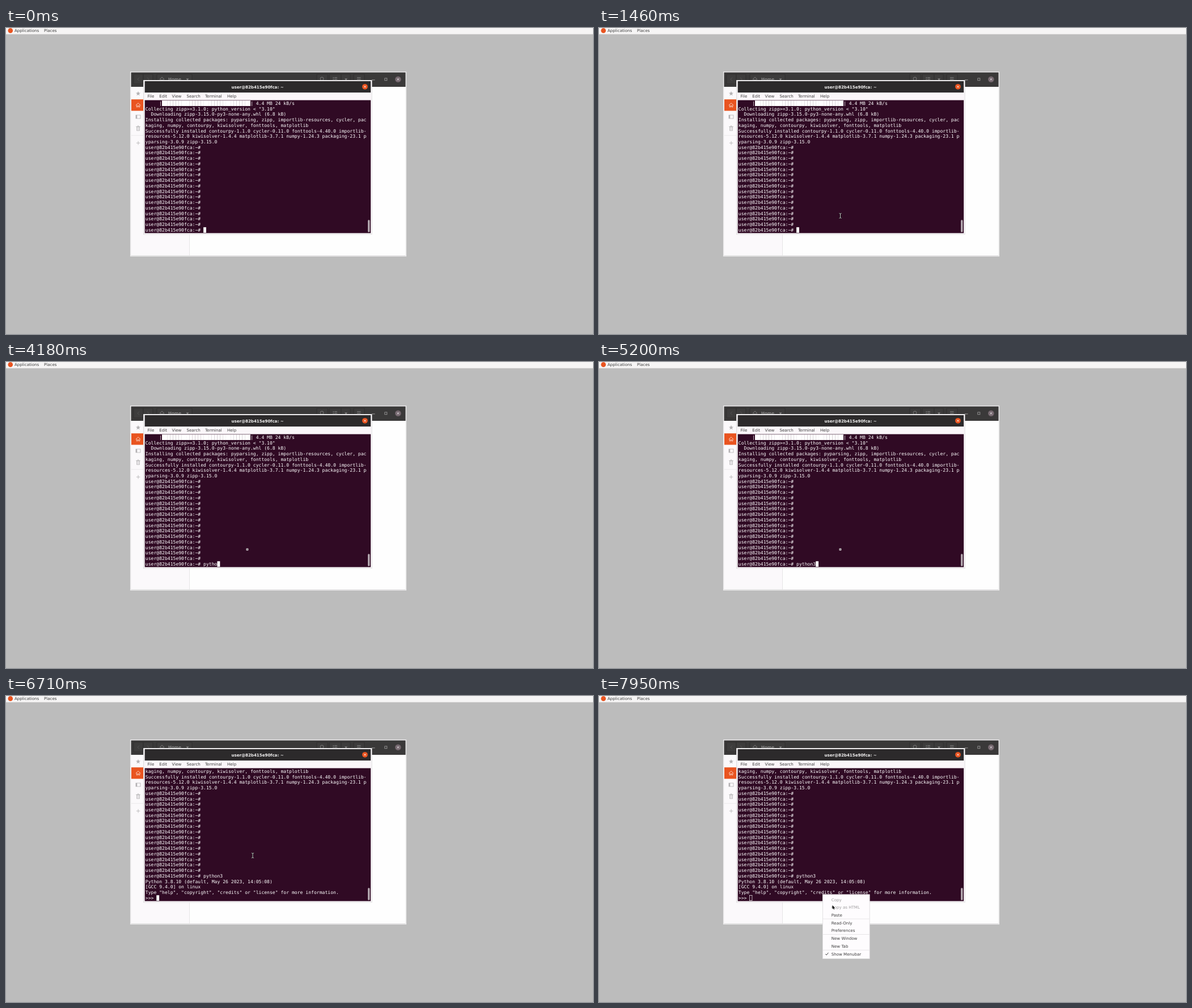
An HTML page with a canvas that plays this animation: 1035 by 541 pixels, repeating every 8 s.

```html
<!DOCTYPE html>
<html lang="en">
<head>
<meta charset="utf-8">
<title>Terminal session</title>
<style>
html, body { margin: 0; width: 100%; height: 100%; overflow: hidden; background: #bcbcbc; }
canvas { display: block; width: 1035px; height: 541px; }
</style>
</head>
<body>
<canvas id="stage" width="1035" height="541"></canvas>
<script>
const ctx = document.getElementById('stage').getContext('2d');
const LOOP = 8000;
const UI = '"DejaVu Sans", sans-serif';
const MONO = '"DejaVu Sans Mono", monospace';
const COL = 4.871, ROW = 9.741, LEFT = 245.8, TOP = 128.2, ROWS = 24;
const ACCENT = '#e95420';

const HOST = 'user@82b415e90fca';
const PROMPT = HOST + ':~# ';
const HEAD = [
  '     |' + '\u2588'.repeat(32) + '| 4.4 MB 24 kB/s',
  'Collecting zipp>=3.1.0; python_version < "3.10"',
  '  Downloading zipp-3.15.0-py3-none-any.whl (6.8 kB)',
  'Installing collected packages: pyparsing, zipp, importlib-resources, cycler, pac',
  'kaging, numpy, contourpy, kiwisolver, fonttools, matplotlib',
  'Successfully installed contourpy-1.1.0 cycler-0.11.0 fonttools-4.40.0 importlib-',
  'resources-5.12.0 kiwisolver-1.4.4 matplotlib-3.7.1 numpy-1.24.3 packaging-23.1 p',
  'yparsing-3.0.9 zipp-3.15.0'
];
const BANNER = [
  'Python 3.8.10 (default, May 26 2023, 14:05:08)',
  '[GCC 9.4.0] on linux',
  'Type "help", "copyright", "credits" or "license" for more information.'
];
const COMMAND = 'python3';
const KEY_TIMES = [2870, 3800, 4030, 4100, 4180, 4350, 5200];
const RUN = 5520, MENU = 7500;
const BLINK_OFF = [[3480, 3800], [4900, 5200], [6070, 6710], [7250, MENU]];

// Pointer stops: time, x, y, shape
const POINTER = [
  [0, 0, 0, 'none'],
  [150, 893, 536, 'arrow'], [230, 800, 521, 'arrow'], [310, 690, 492, 'arrow'],
  [390, 600, 455, 'arrow'], [470, 522, 410, 'arrow'], [545, 490, 379, 'arrow'],
  [620, 450, 347, 'beam'], [700, 428, 327, 'beam'], [780, 421, 320, 'beam'],
  [1390, 423.5, 327, 'beam'], [1460, 425.5, 332, 'beam'], [2790, 425.5, 331.5, 'dot'],
  [6390, 429, 315, 'beam'], [6460, 436, 278.5, 'beam'],
  [6710, 435, 282, 'beam'], [6790, 428, 297, 'beam'], [6870, 417, 317, 'beam'],
  [6950, 406, 334, 'beam'], [7030, 397, 347, 'beam'], [7100, 394.2, 351, 'beam'],
  [MENU, 394, 351, 'arrow'],
  [7800, 400, 357, 'arrow'], [7870, 406.5, 364.5, 'arrow'], [7950, 411.5, 370, 'arrow']
];

function rect(x, y, w, h, fill) {
  ctx.fillStyle = fill;
  ctx.fillRect(x, y, w, h);
}

function disc(x, y, r, fill) {
  ctx.fillStyle = fill;
  ctx.beginPath();
  ctx.arc(x, y, r, 0, Math.PI * 2);
  ctx.fill();
}

function line(points, color, width = 0.8, close = false) {
  ctx.beginPath();
  points.forEach(([x, y]) => ctx.lineTo(x, y));
  if (close) ctx.closePath();
  ctx.strokeStyle = color;
  ctx.lineWidth = width;
  ctx.stroke();
}

function frame(x, y, w, h, color, width = 0.7) {
  ctx.strokeStyle = color;
  ctx.lineWidth = width;
  ctx.strokeRect(x, y, w, h);
}

// y is the middle of the capitals
function label(text, x, y, color, weight = '', align = 'left') {
  ctx.font = `${weight} 7.08px ${UI}`;
  ctx.textAlign = align;
  ctx.fillStyle = color;
  ctx.fillText(text, x, y + 2.55);
}

function cross(x, y, r, color) {
  line([[x - r, y - r], [x + r, y + r]], color, 0.9);
  line([[x + r, y - r], [x - r, y + r]], color, 0.9);
}

function caret(x, y, color) {
  ctx.fillStyle = color;
  ctx.beginPath();
  ctx.moveTo(x - 2.4, y - 1.2);
  ctx.lineTo(x + 2.4, y - 1.2);
  ctx.lineTo(x, y + 1.6);
  ctx.fill();
}

function house(x, y, color) {
  line([[x - 4, y + 0.3], [x, y - 3.7], [x + 4, y + 0.3]], color);
  line([[x - 2.8, y - 0.6], [x - 2.8, y + 3.4], [x - 0.9, y + 3.4], [x - 0.9, y + 1.2],
    [x + 0.9, y + 1.2], [x + 0.9, y + 3.4], [x + 2.8, y + 3.4], [x + 2.8, y - 0.6]], color);
}

function star(x, y, color) {
  ctx.fillStyle = color;
  ctx.beginPath();
  for (let i = 0; i < 10; i++) {
    const r = i % 2 ? 1.8 : 4.3, a = i * Math.PI / 5 - Math.PI / 2;
    ctx.lineTo(x + r * Math.cos(a), y + r * Math.sin(a));
  }
  ctx.fill();
}

function panel() {
  rect(0, 0, 1035, 541, '#bcbcbc');
  rect(0, 0, 1035, 11, '#f6f5f5');
  rect(0, 10.6, 1035, 0.7, '#dedddd');
  disc(7.8, 4.6, 4.3, ACCENT);
  label('Applications', 15, 4.6, '#3d3d3d');
  label('Places', 67, 4.6, '#3d3d3d');
}

function fileWindow() {
  const dim = '#8b8a8a';
  rect(219, 77, 487, 327, '#f3f2f3');
  rect(220.5, 78.5, 484, 25.5, '#3a3939');
  rect(221, 104, 102, 298, '#fbf9fb');
  rect(323, 104, 0.8, 298, '#dcdadc');
  rect(323.8, 104, 380.2, 298, '#fefefe');
  frame(219.3, 77.3, 486.4, 326.4, '#e6e5e6');
  rect(220.5, 402, 484, 0.8, '#d8d7d8');

  for (const [x, w] of [[225, 17], [242, 17], [266, 62], [548, 19], [570, 21], [591, 16], [613, 19]]) {
    rect(x, 82, w, 17, '#3d3c3c');
    frame(x, 82, w, 17, '#2b2a2a');
  }
  line([[235, 87.6], [232, 90.6], [235, 93.6]], '#5c5b5b');
  line([[249, 87.6], [252, 90.6], [249, 93.6]], '#5c5b5b');
  house(275, 90.5, dim);
  label('Home', 286, 90.6, dim, 'bold');
  caret(320, 90.8, dim);
  ctx.beginPath();
  ctx.arc(557, 89.8, 2.9, 0, Math.PI * 2);
  ctx.stroke();
  for (let i = 0; i < 3; i++) {
    const y = 87.8 + i * 2.8;
    rect(576.5, y - 0.6, 1.5, 1.2, dim);
    rect(579, y - 0.5, 5, 0.9, dim);
    rect(619, y - 0.5, 6.5, 0.9, dim);
  }
  caret(599.5, 90.8, dim);
  rect(645, 91.4, 5.5, 0.9, '#a5a4a4');
  frame(667.8, 88.8, 4, 4, '#a5a4a4', 0.8);
  disc(691.3, 90.8, 5.3, '#75686f');
  cross(691.3, 90.8, 1.8, '#f0eef0');

  const grey = '#b3b1b3';
  star(233, 116, grey);
  rect(221, 126.2, 102, 20.2, ACCENT);
  house(233, 136.3, '#ffe7de');
  frame(229, 154, 8, 6, grey, 0.8);
  rect(229, 154, 2.2, 6, grey);
  frame(230.7, 175.2, 4.6, 6.1, grey, 0.9);
  line([[229.2, 174.4], [236.8, 174.4]], grey, 0.9);
  line([[231.7, 173], [234.3, 173]], grey, 0.9);
  line([[232.2, 177], [232.2, 180]], grey, 0.6);
  line([[233.9, 177], [233.9, 180]], grey, 0.6);
  rect(221, 189.6, 102, 0.7, '#e2e0e2');
  line([[229.8, 203.3], [236.4, 203.3]], grey);
  line([[233.1, 200], [233.1, 206.6]], grey);
}

function terminalFrame() {
  rect(242, 92, 403.5, 273.3, '#dad9da');
  rect(242.8, 92.6, 402, 272, '#f5f3f5');
  rect(244.7, 94, 398.4, 20.3, '#2c2a2b');
  label(HOST + ': ~', 443.5, 104, '#f3f2f2', 'bold', 'center');
  disc(632.9, 103.8, 4.9, ACCENT);
  cross(632.9, 103.8, 1.6, '#ffffff');
  rect(244.7, 114.3, 398.4, 13.3, '#faf6f9');
  const items = { File: 249.5, Edit: 270.2, View: 292.5, Search: 318.5, Terminal: 350.9, Help: 390 };
  for (const name in items) label(name, items[name], 120.9, '#3d3d3d');
  rect(244.7, 127.6, 398.4, 235, '#300a24');
  ctx.fillStyle = '#b3a8af';
  ctx.beginPath();
  ctx.roundRect(638, 339.3, 3.5, 21.7, 1.7);
  ctx.fill();
}

function bufferAt(t) {
  const lines = HEAD.concat(Array(15).fill(PROMPT));
  const typed = KEY_TIMES.filter(k => k <= t).length;
  lines.push(PROMPT + COMMAND.slice(0, typed));
  if (t >= RUN) lines.push(...BANNER, '>>> ');
  return lines.slice(-ROWS);
}

function terminalText(t) {
  const lines = bufferAt(t);
  ctx.font = `8.09px ${MONO}`;
  ctx.textAlign = 'left';
  ctx.fillStyle = '#ffffff';
  lines.forEach((text, row) => {
    const y = TOP + row * ROW;
    [...text].forEach((ch, col) => {
      const x = LEFT + col * COL;
      if (ch === '\u2588') ctx.fillRect(x, y, COL + 0.1, ROW);
      else if (ch !== ' ') ctx.fillText(ch, x, y + 7.6);
    });
  });

  const x = LEFT + lines[ROWS - 1].length * COL, y = TOP + (ROWS - 1) * ROW;
  if (t >= MENU) frame(x + 0.3, y + 0.3, COL - 0.5, ROW - 0.6, '#ffffff', 0.65);
  else if (!BLINK_OFF.some(([from, to]) => t >= from && t < to)) rect(x, y, COL, ROW, '#ffffff');
}

function contextMenu() {
  rect(394, 350.7, 83.4, 114, '#fefcfe');
  frame(394.3, 351, 82.8, 113.4, '#cfcdcf', 0.6);
  const items = [['Copy', 360], ['Copy as HTML', 373.5], ['Paste', 387], ['Read-Only', 401],
    ['Preferences', 414.5], ['New Window', 428.5], ['New Tab', 442], ['Show Menubar', 456]];
  items.forEach(([name, y], i) => label(name, 409.7, y, i < 2 ? '#a09fa0' : '#3d3d3d'));
  for (const y of [393.7, 421.2, 448.8]) rect(394.6, y, 82.2, 0.7, '#dedcde');
  line([[399.2, 456.2], [401, 458], [404.4, 453.8]], '#3d3d3d', 1);
}

function arrow(x, y) {
  const shape = [[0, 0], [0, 6.6], [1.5, 5.2], [2.6, 7.5], [3.7, 7], [2.7, 4.8], [4.7, 4.7]]
    .map(([dx, dy]) => [x + dx, y + dy]);
  line(shape, '#ffffff', 1.2, true);
  ctx.fillStyle = '#000000';
  ctx.fill();
}

function beam(x, y) {
  const strokes = [['#000000', 1.9], ['#ffffff', 0.8]];
  for (const [color, width] of strokes) {
    line([[x, y - 3.6], [x, y + 3.6]], color, width);
    for (const s of [-1, 1]) {
      line([[x - 2.1, y + s * 4.3], [x, y + s * 3.7], [x + 2.1, y + s * 4.3]], color, width);
    }
  }
}

function dot(x, y) {
  rect(x - 1.9, y - 1.9, 3.6, 3.6, '#ffffff');
  rect(x - 0.9, y - 0.9, 1.6, 1.6, '#000000');
}

function pointer(t) {
  const [, x, y, shape] = POINTER.findLast(stop => stop[0] <= t);
  if (shape === 'arrow') arrow(x, y);
  else if (shape === 'beam') beam(x, y);
  else if (shape === 'dot') dot(x, y);
}

function draw(t) {
  panel();
  fileWindow();
  terminalFrame();
  terminalText(t);
  if (t >= MENU) contextMenu();
  pointer(t);
}

ctx.textRendering = 'geometricPrecision';
const start = performance.now();
function tick() {
  draw((performance.now() - start) % LOOP);
  requestAnimationFrame(tick);
}
tick();
</script>
</body>
</html>
```
